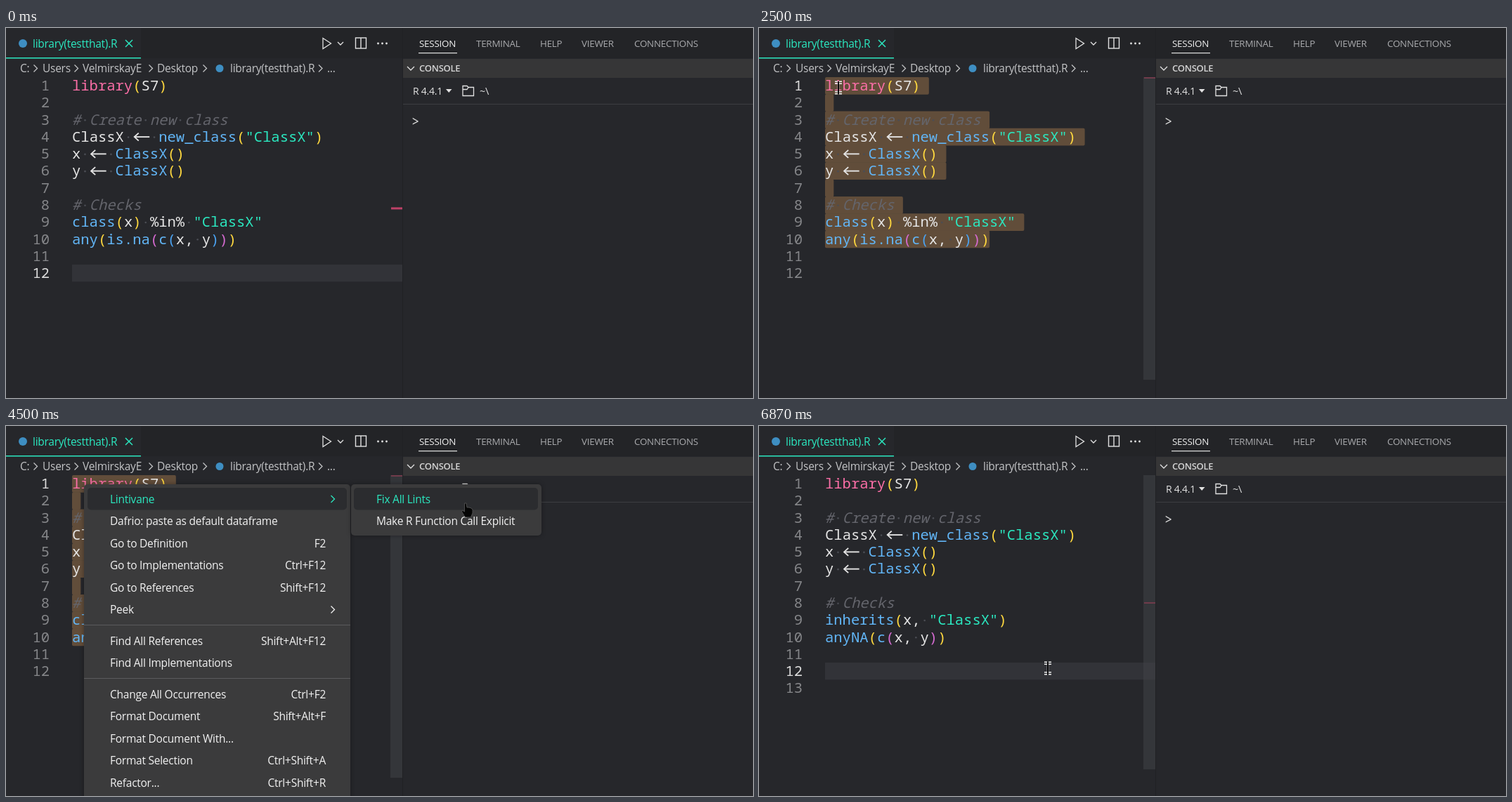
Write an HTML page with a canvas that moves like this. It is 1063x527 px and loops after 6.9 s.

```html
<!DOCTYPE html>
<html lang="en">
<head>
<meta charset="utf-8">
<title>Editor lint fix</title>
<style>
  html, body { margin: 0; width: 100%; height: 100%; overflow: hidden; background: #26272b; }
  canvas { display: block; }
</style>
</head>
<body>
<canvas id="stage" width="1063" height="527"></canvas>
<script>
const ctx = document.getElementById('stage').getContext('2d');
const LOOP = 6900;
const MONO = '"Noto Sans Mono", monospace';
const SANS = '"Open Sans", "Noto Sans", sans-serif';
const CODE_X = 94, TOP = 70, ROW = 24.27, CHAR = 12.32, EDITOR_R = 564;

const C = {
  bg: '#26272b', bar: '#232427', header: '#363637', line: '#3d3e42', text: '#e2e2e2', dim: '#a9aaad',
  teal: '#2be8c0', pink: '#fa6ea6', blue: '#62b6f7', yellow: '#ffd93f', purple: '#d66bd2',
  comment: '#64656c', select: '#614d3a', menu: '#3b3b3c', menuText: '#f2f2f2', hover: '#2b2c2f', icon: '#3e8ec2'
};

const HEAD = ['library(S7)', '', '# Create new class', 'ClassX <- new_class("ClassX")',
  'x <- ClassX()', 'y <- ClassX()', '', '# Checks'];
const BEFORE = [...HEAD, 'class(x) %in% "ClassX"', 'any(is.na(c(x, y)))', '', ''];
const AFTER = [...HEAD, 'inherits(x, "ClassX")', 'anyNA(c(x, y))', '', '', ''];

const T = { enter: 500, drag: 1400, release: 1900, menu: 2830, hover: 3420, submenu: 3800,
  close: 4840, fixed: 4970, click: 6350 };

// time, x, y of the pointer
const PATH = [
  [500, 445, 535], [830, 357, 305], [1400, 357, 305], [1600, 62, 110], [1670, 42, 85],
  [1850, 38, 45], [2070, 38, 36], [2100, 38, 36], [2500, 113, 85], [2830, 113, 85],
  [3000, 125, 86], [3330, 125, 86], [3650, 300, 104], [4030, 470, 106], [4500, 656, 110],
  [5730, 656, 110], [6030, 411, 345], [6900, 411, 345]
];

const MENU = [
  ['Lintivane', '>'], ['Dafrio: paste as default dataframe'], ['Go to Definition', 'F2'],
  ['Go to Implementations', 'Ctrl+F12'], ['Go to References', 'Shift+F12'], ['Peek', '>'], null,
  ['Find All References', 'Shift+Alt+F12'], ['Find All Implementations'], null,
  ['Change All Occurrences', 'Ctrl+F2'], ['Format Document', 'Shift+Alt+F'],
  ['Format Document With...'], ['Format Selection', 'Ctrl+Shift+A'], ['Refactor...', 'Ctrl+Shift+R']
];

const clamp = (v, a, b) => Math.min(b, Math.max(a, v));
const rowMid = r => 82.3 + ROW * r;
const baseline = r => Math.round(rowMid(r) + 6.8);

function pointer(t) {
  const i = PATH.findIndex(p => p[0] > t);
  if (i < 1) return { x: PATH[0][1], y: PATH[0][2] };
  const [t0, x0, y0] = PATH[i - 1], [t1, x1, y1] = PATH[i];
  const k = (t - t0) / (t1 - t0);
  return { x: x0 + (x1 - x0) * k, y: y0 + (y1 - y0) * k };
}

function rect(x, y, w, h, fill, r = 0) {
  ctx.fillStyle = fill;
  ctx.beginPath();
  ctx.roundRect(x, y, w, h, r);
  ctx.fill();
}

function poly(points, { stroke, fill, width = 1.3, close = false }) {
  ctx.beginPath();
  points.forEach(([x, y]) => ctx.lineTo(x, y));
  if (close) ctx.closePath();
  if (fill) { ctx.fillStyle = fill; ctx.fill(); }
  if (stroke) { ctx.strokeStyle = stroke; ctx.lineWidth = width; ctx.stroke(); }
}

function disc(x, y, r, fill) {
  ctx.fillStyle = fill;
  ctx.beginPath();
  ctx.arc(x, y, r, 0, Math.PI * 2);
  ctx.fill();
}

function label(str, x, y, { color = C.text, size = 15.5, weight = 400, align = 'left' } = {}) {
  ctx.font = `${weight} ${size}px ${SANS}`;
  ctx.letterSpacing = '-0.25px';
  ctx.textAlign = align;
  ctx.fillStyle = color;
  ctx.fillText(str, x, Math.round(y + size * 0.36));
}

function mono(str, x, y, color, { style = '', size = CHAR / 0.6, align = 'left' } = {}) {
  ctx.font = `${style} ${size}px ${MONO}`;
  ctx.letterSpacing = '0px';
  ctx.textAlign = align;
  ctx.fillStyle = color;
  ctx.fillText(str, x, y);
}

const chevRight = (x, y, color = C.text, s = 5) =>
  poly([[x - s / 2, y - s], [x + s / 2, y], [x - s / 2, y + s]], { stroke: color });
const chevDown = (x, y, color = C.text, s = 5) =>
  poly([[x - s, y - s / 2], [x, y + s / 2], [x + s, y - s / 2]], { stroke: color });

function drawArrow(col, y) {
  const x = CODE_X + col * CHAR;
  const style = { stroke: '#e4e4e4', width: 1.9 };
  poly([[x + 2.5, y], [x + 24, y]], style);
  poly([[x + 8.5, y - 5.5], [x + 2.5, y], [x + 8.5, y + 5.5]], style);
}

function drawCode(line, row) {
  const mid = rowMid(row), base = baseline(row);
  const at = col => CODE_X + col * CHAR;
  for (let i = 0; i < line.length; i++)
    if (line[i] === ' ') disc(at(i + 0.5), mid + 0.5, 1.3, '#4b4d54');
  if (line.startsWith('#')) return mono(line, CODE_X, base, C.comment, { style: 'italic' });
  const brackets = [C.yellow, C.purple, '#4ba3f2'];
  let depth = 0;
  for (const m of line.matchAll(/"[^"]*"|<-|[\w.]+(?=\()|[()]|./g)) {
    const s = m[0];
    let color = '#e6e6e6';
    if (s === '<-') { drawArrow(m.index, mid); continue; }
    if (s[0] === '"') color = C.teal;
    else if (s === '(') color = brackets[depth++];
    else if (s === ')') color = brackets[--depth];
    else if (s === 'library') color = C.pink;
    else if (line[m.index + s.length] === '(') color = C.blue;
    mono(s, at(m.index), base, color);
  }
}

function caretAt(t, lines) {
  if (t < T.drag || t >= T.click) return { row: 11, col: 0 };
  const p = pointer(Math.max(T.drag, Math.min(t, T.release) - 60));
  const row = clamp(Math.floor((p.y - TOP) / ROW), 0, 9);
  const col = clamp(Math.round((p.x - CODE_X) / CHAR), 0, lines[row].length);
  return { row, col };
}

function drawSelection(lines, caret, newlineAtEnd) {
  for (let r = caret.row; r <= 9; r++) {
    const from = r === caret.row ? caret.col : 0;
    const to = lines[r].length + (r < 9 || newlineAtEnd ? 1 : 0);
    if (to > from)
      rect(CODE_X + from * CHAR, TOP + r * ROW, (to - from) * CHAR, ROW + 0.5, C.select, 2);
  }
}

function drawEditor(t) {
  const fixed = t >= T.fixed, lines = fixed ? AFTER : BEFORE;
  const caret = caretAt(t, lines);
  const selecting = t >= T.drag && t < T.click;
  const brackets = t >= T.drag && t < 1720;
  const slider = clamp((t - T.enter) / 200, 0, 1);
  const trackH = fixed ? 419 : 431;
  const rulerStep = fixed ? 16.45 : 16.9;

  if (selecting) drawSelection(lines, caret, fixed);
  else rect(CODE_X, TOP + 11 * ROW, EDITOR_R - CODE_X, ROW, '#323338');

  if (brackets) for (const col of [3, 18]) {
    ctx.strokeStyle = '#3fae94';
    ctx.lineWidth = 1;
    ctx.strokeRect(CODE_X + col * CHAR + 0.5, TOP + 9 * ROW + 0.5, CHAR - 0.5, ROW - 1);
  }

  lines.forEach((line, r) => {
    mono(r + 1, 62, baseline(r), r === caret.row ? '#dcdcdc' : '#858689', { align: 'right' });
    drawCode(line, r);
  });

  const blinkOn = (t >= T.drag && t < 2500) || (t >= T.close && t < 5530) || (t >= 6030 && t < 6870);
  if (blinkOn) rect(CODE_X + caret.col * CHAR, TOP + caret.row * ROW, 2.5, ROW, '#f04a72');

  // overview ruler and scrollbar
  const markY = 71 + caret.row * rulerStep;
  if (slider < 1) rect(548, markY - 1.5, 16, 3, '#bd4167');
  ctx.globalAlpha = slider;
  rect(547, TOP, 17, trackH, '#34363a');
  if (!selecting) rect(547, TOP + 11 * ROW, 17, ROW, '#3a3b40');
  rect(548, markY - 1, 16, 2, '#713b4b');
  if (brackets) rect(552, 71 + 9 * rulerStep - 1, 7, 18, '#737477');
  ctx.globalAlpha = 1;
}

function drawFrame() {
  rect(0, 0, 1063, 527, C.bg);
  rect(192, 0, EDITOR_R - 192, 43, C.bar);
  rect(0, 42, 192, 1.5, C.teal);
  disc(24, 22, 6, C.icon);
  label('library(testthat).R', 38, 22.5, { color: C.teal });
  poly([[170, 17], [180, 27]], { stroke: C.teal, width: 1.5 });
  poly([[180, 17], [170, 27]], { stroke: C.teal, width: 1.5 });

  poly([[451, 14.5], [462.5, 22], [451, 29.5]], { stroke: C.text, close: true });
  chevDown(476, 22, C.text, 4);
  ctx.strokeStyle = C.text;
  ctx.lineWidth = 1.4;
  ctx.strokeRect(497.5, 14, 15, 15);
  poly([[505, 14], [505, 29]], { stroke: C.text, width: 1.4 });
  for (const x of [529.5, 535.5, 541.5]) disc(x, 22, 1.4, C.text);

  const crumb = { color: '#c2c3c5' };
  label('C:', 20, 57.5, crumb);
  label('Users', 52, 57.5, crumb);
  label('VelmirskayE', 109, 57.5, crumb);
  label('Desktop', 215, 57.5, crumb);
  label('library(testthat).R', 319, 57.5, crumb);
  label('...', 457, 57.5, crumb);
  for (const x of [42, 100, 206, 283, 447.5]) chevRight(x, 57.5, crumb.color);
  disc(304, 57.5, 5.5, C.icon);
}

function drawPanel() {
  rect(EDITOR_R, 0, 1, 527, '#202124');
  rect(565, 0, 498, 43, C.bar);
  const tabs = [['SESSION', 588], ['TERMINAL', 669], ['HELP', 760], ['VIEWER', 819], ['CONNECTIONS', 894]];
  tabs.forEach(([name, x], i) => label(name, x, 22.5, { size: 13.4, color: i ? C.dim : '#f0f0f0' }));
  rect(587, 35, 55, 1.3, '#dcdcdc');

  rect(565, 44, 498, 27, C.header);
  chevDown(576, 57.5, C.text);
  label('CONSOLE', 588, 57.5, { size: 13, weight: 600, color: '#d4d4d4' });

  label('R 4.4.1', 579, 90, { size: 14 });
  poly([[626, 87], [634.5, 87], [630.2, 92]], { fill: C.text, close: true });
  poly([[650, 96.5], [650, 82.5], [656, 82.5], [658, 84.5], [665.5, 84.5], [665.5, 96.5]],
    { stroke: C.text, close: true });
  poly([[650, 87.5], [656, 87.5], [658, 84.5]], { stroke: C.text });
  label('~\\', 674, 90, { size: 14.5 });
  rect(565, 108, 498, 1, C.line);
  mono('>', 577, 140, '#d8d8d8', { size: 19 });
}

function popup(x, y, w, h) {
  ctx.save();
  ctx.shadowColor = 'rgba(0,0,0,.35)';
  ctx.shadowBlur = 6;
  rect(x, y, w, h, C.menu, 5);
  ctx.restore();
}

function drawMenu(t, p) {
  popup(111, 83, 379, 460);
  const hovered = t >= T.hover;
  if (hovered) rect(116, 88, 369, 31.5, C.hover, 5);
  let y = 104;
  MENU.forEach((item, i) => {
    if (!item) {
      rect(111, Math.round(y - 10), 379, 1, '#5b5b5d');
      y += 13;
      return;
    }
    const color = hovered && i === 0 ? C.teal : C.menuText;
    label(item[0], 148, y, { color });
    if (item[1] === '>') chevRight(465, y, color);
    else if (item[1]) label(item[1], 455, y, { color, align: 'right' });
    y += 31.5;
  });

  if (t < T.submenu) return;
  popup(491, 83, 271, 73);
  const inside = p.x > 495;
  if (inside) rect(495, 88, 262, 31.5, C.hover, 5);
  label('Fix All Lints', 527, 104, { color: inside ? C.teal : C.menuText });
  label('Make R Function Call Explicit', 527, 135.5, { color: C.menuText });
}

function drawPointer(t, p) {
  const solid = { fill: '#050505', stroke: '#5a5a5a', width: 0.8, close: true };
  ctx.save();
  ctx.translate(p.x, p.y);
  if (t < T.menu || t >= T.close) {
    rect(-1.5, -9, 3, 18, 'rgba(235,235,235,.5)');
    rect(-1, -9, 2, 18, '#08080a');
    for (const y of [-9.5, -6.5, 5, 8]) {
      rect(-5, y, 4, 1.5, '#f0f0f0');
      rect(1, y, 4, 1.5, '#f0f0f0');
    }
  } else if (t < T.hover) {
    poly([[0, 0], [0, 15], [3.6, 11.8], [6, 17], [8.5, 16], [6.2, 11], [10.5, 10.6]], solid);
  } else {
    ctx.lineJoin = 'round';
    poly([[-3.5, 0], [-1, 0], [0, 6], [3, 6], [6, 7], [8, 9], [8, 14], [5.5, 20], [-2.5, 20],
      [-7.5, 12], [-6.5, 10], [-3.5, 12]], solid);
  }
  ctx.restore();
}

function render(t) {
  const p = pointer(t);
  drawFrame();
  drawEditor(t);
  drawPanel();
  if (t >= T.menu && t < T.close) drawMenu(t, p);
  if (t >= T.enter) drawPointer(t, p);
}

let start;
function tick(now) {
  start ??= now;
  render((now - start) % LOOP);
  requestAnimationFrame(tick);
}
requestAnimationFrame(tick);
</script>
</body>
</html>
```
